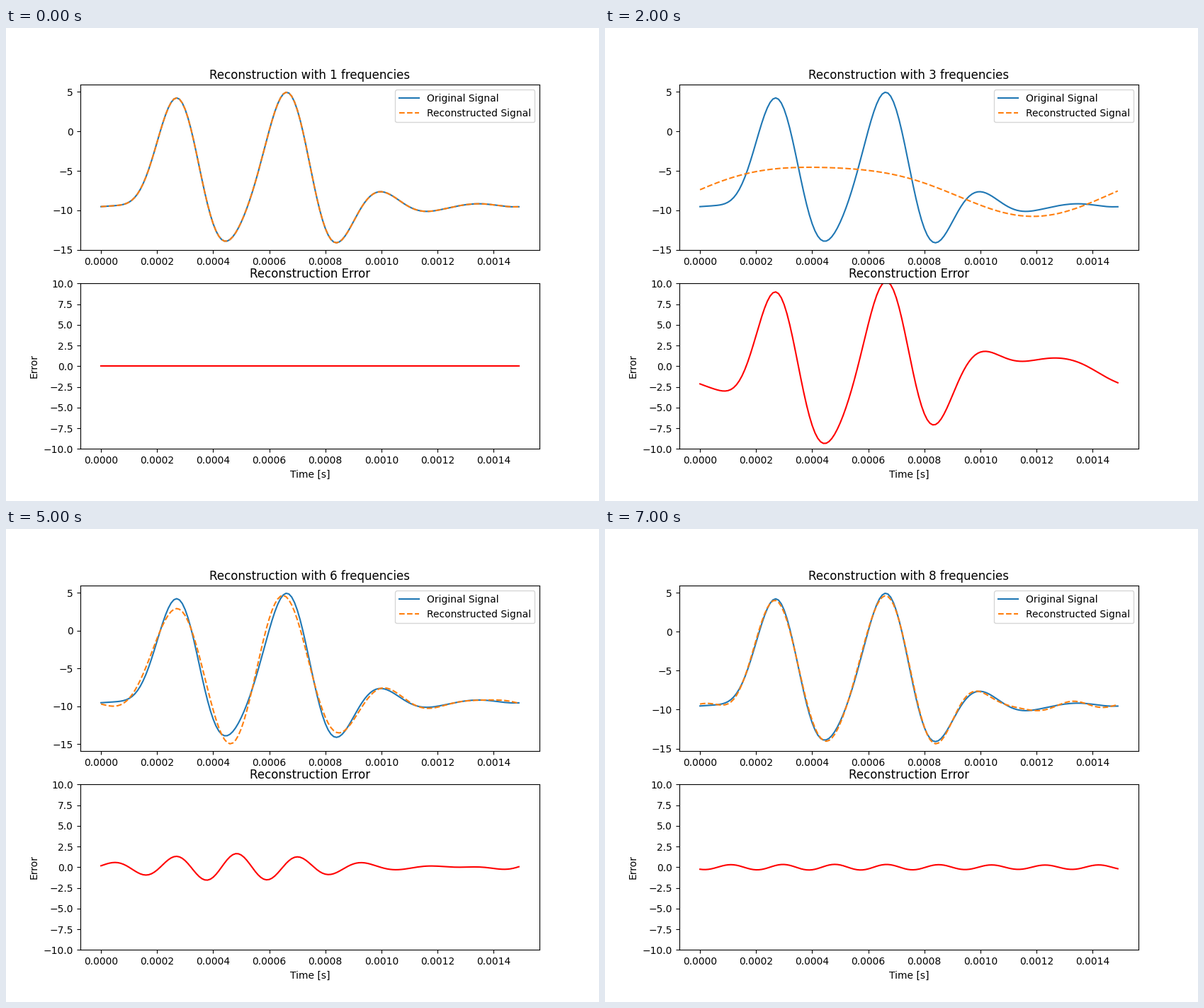
Animation of 837 by 669 pixels, one loop 8 s. Source, as a matplotlib script:

```python
import numpy as np
import matplotlib.pyplot as plt
from matplotlib.animation import FuncAnimation

SAMPLES, STEP = 150, 1e-5
MEAN = -7.13
# (cosine, sine) weight of each harmonic, lowest first
HARMONICS = [
    (-0.70, 3.02), (0.44, 0.31), (-2.96, 2.577), (-0.87, -4.75),
    (1.519, 1.056), (0.506, -0.215), (-0.087, 0.755),
    (-0.276, -0.117), (0.029, -0.027),
]

time = np.arange(SAMPLES) * STEP
angle = 2 * np.pi * np.arange(SAMPLES) / SAMPLES


def partial_sum(count):
    """Mean plus the first `count` harmonics."""
    total = np.full(SAMPLES, MEAN)
    for k, (a, b) in enumerate(HARMONICS[:count], start=1):
        total += a * np.cos(k * angle) + b * np.sin(k * angle)
    return total


signal = partial_sum(len(HARMONICS))

# A hair over 8.37 in, so the width does not round down to 836 px.
fig, (top, bottom) = plt.subplots(2, 1, figsize=(8.37001, 6.69001), dpi=100)


def draw(step):
    # The first step keeps the whole spectrum.
    rebuilt = partial_sum(step) if step else signal

    top.clear()
    top.plot(time, signal, label="Original Signal")
    top.plot(time, rebuilt, "--", label="Reconstructed Signal")
    top.set_title(f"Reconstruction with {step + 1} frequencies")
    top.legend(loc="upper right")

    bottom.clear()
    bottom.plot(time, signal - rebuilt, color="red")
    bottom.set_title("Reconstruction Error")
    bottom.set_xlabel("Time [s]")
    bottom.set_ylabel("Error")
    bottom.set_ylim(-10, 10)
    return []


anim = FuncAnimation(fig, draw, frames=8, init_func=lambda: draw(0),
                     interval=1000, repeat=True, repeat_delay=0)
plt.show()
```
